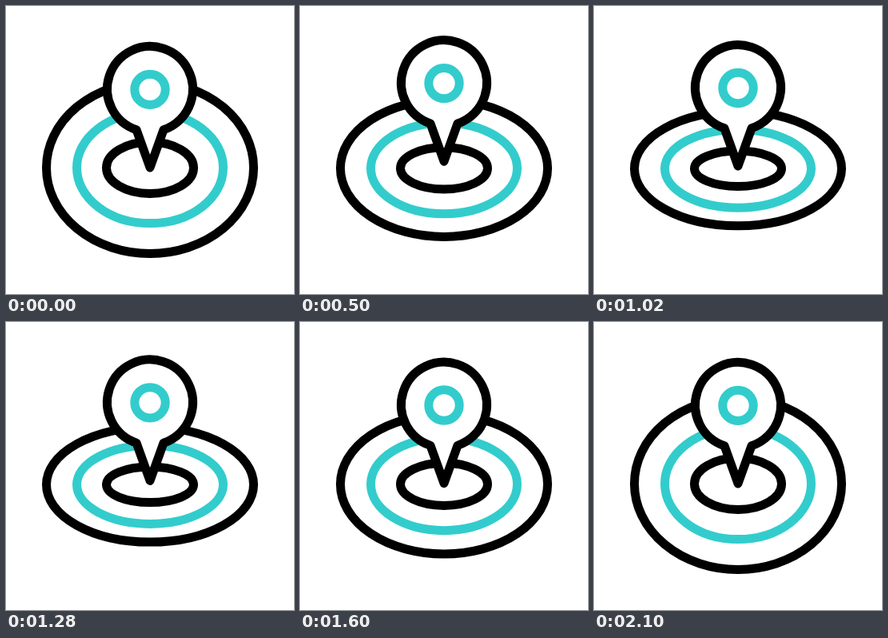
An HTML page with a canvas that plays this animation: 360 by 360 pixels, repeating every 2.4 s.

```html
<!DOCTYPE html>
<html lang="en">
<head>
<meta charset="utf-8">
<title>Location pin</title>
<style>
  html, body { margin: 0; width: 100%; height: 100%; overflow: hidden; background: #fff; }
  canvas { display: block; width: 360px; height: 360px; }
</style>
</head>
<body>
<canvas id="stage"></canvas>
<script>
const LOOP = 2400, STEP = 20, SIZE = 360;
const BLACK = '#000', TEAL = '#33cccc';
const CX = 180;

const canvas = document.getElementById('stage');
const ratio = window.devicePixelRatio || 1;
canvas.width = canvas.height = Math.round(SIZE * ratio);
const ctx = canvas.getContext('2d');

const clamp = x => Math.min(1, Math.max(0, x));
const mix = (a, b, p) => a + (b - a) * p;
const phase = (t, from, to) => clamp((t - from) / (to - from));
const ease = x => x * x * x * (x * (6 * x - 15) + 10);

// Two hops, the second half as high
function lift(t) {
  return 8 * Math.sin(Math.PI * phase(t, 50, 1100)) +
         4 * Math.sin(Math.PI * phase(t, 1100, 1615));
}

// 0 = rings open, 1 = rings flattened
function flatness(t) {
  return ease(phase(t, 20, 880)) - ease(phase(t, 1190, 2070));
}

function ring(x, y, rx, ry, color) {
  ctx.beginPath();
  ctx.ellipse(x, y, rx, ry, 0, 0, 2 * Math.PI);
  ctx.strokeStyle = color;
  ctx.stroke();
}

function pin(y) {
  const r = 53.5, half = 17;
  const a = Math.acos(half / r);
  ctx.beginPath();
  ctx.arc(CX, y, r, Math.PI - a, a);
  ctx.lineTo(CX, y + 98);
  ctx.closePath();
  ctx.fillStyle = '#fff';
  ctx.fill();
  ctx.strokeStyle = BLACK;
  ctx.stroke();
  ring(CX, y + 0.4, 19.2, 19.2, TEAL);
}

function draw(t) {
  ctx.setTransform(ratio, 0, 0, ratio, 0, 0);
  ctx.fillStyle = '#fff';
  ctx.fillRect(0, 0, SIZE, SIZE);
  ctx.lineWidth = 11;
  ctx.lineJoin = 'round';
  const p = flatness(t);
  const y = mix(202.2, 203.3, p);
  ring(CX, y, 129.5, mix(107.3, 71.5, p), BLACK);
  ring(CX, y, 91.5, mix(69.4, 48.9, p), TEAL);
  ring(CX, y, 54.5, mix(32.2, 22.2, p), BLACK);
  pin(104 - lift(t));
}

const start = performance.now();
function frame() {
  const t = (performance.now() - start) % LOOP;
  draw(Math.floor(t / STEP) * STEP);
  requestAnimationFrame(frame);
}
frame();
</script>
</body>
</html>
```
